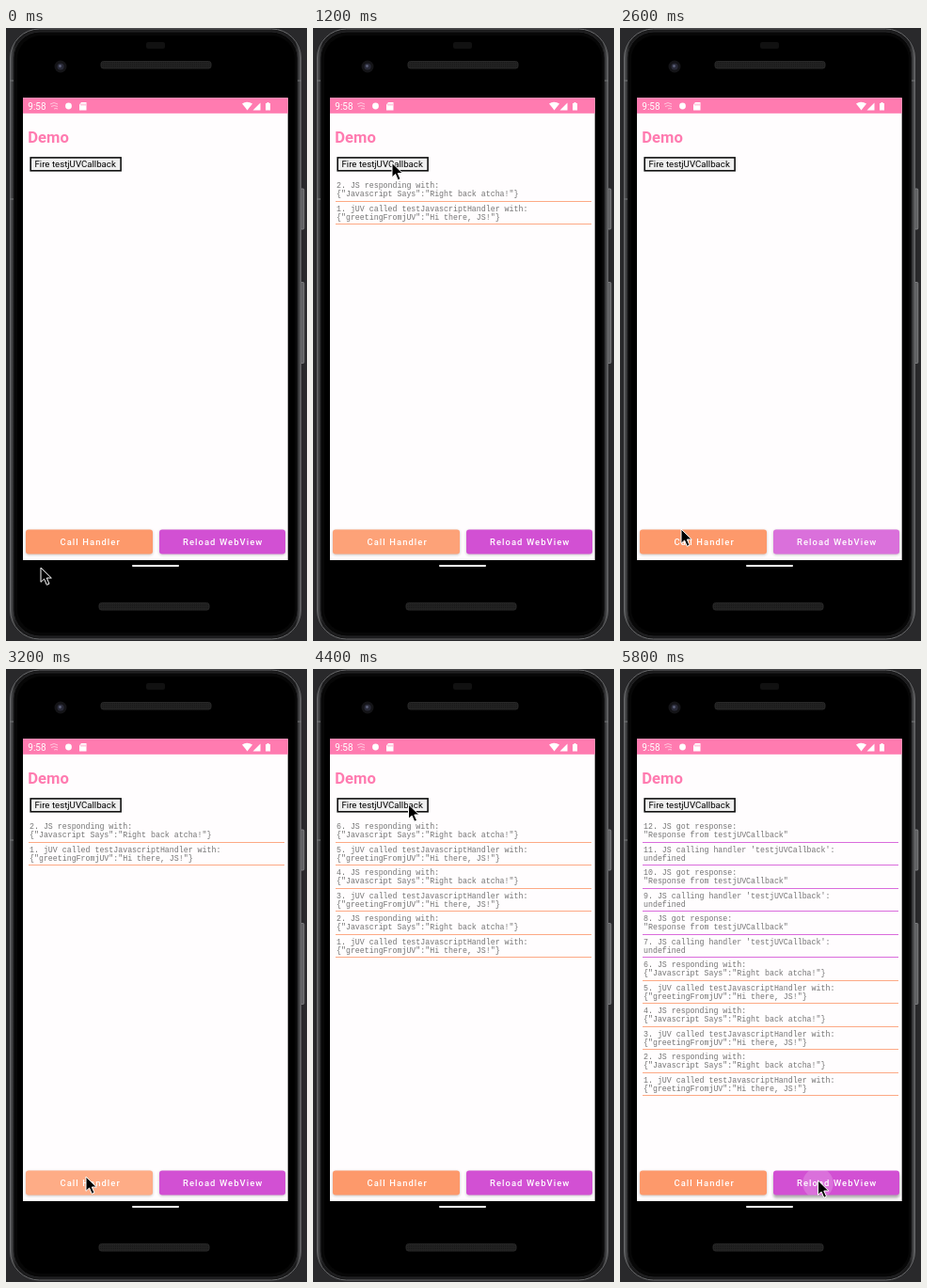
Animation, 320 px wide and 652 px high, one loop 6000 ms. Source, as an HTML page:

```html
<!DOCTYPE html>
<html lang="en">
<head>
<meta charset="utf-8">
<title>Demo</title>
<style>
  html, body { margin: 0; width: 100%; height: 100%; overflow: hidden; background: #29292b; }
  svg { display: block; width: 320px; height: 652px; }
  text { font-family: Roboto, sans-serif; }
  .log text { font: 8.28px "Liberation Mono", monospace; fill: #747474; }
  .log rect { shape-rendering: crispEdges; }
  .label { font-size: 9.4px; font-weight: 500; letter-spacing: 1.08px; fill: #fff; }
</style>
</head>
<body>
<svg viewBox="0 0 320 652">
  <defs>
    <linearGradient id="rim" x2="1" y2="0">
      <stop offset="0" stop-color="#58595b"/>
      <stop offset=".018" stop-color="#1b1b1c"/>
      <stop offset=".982" stop-color="#1b1b1c"/>
      <stop offset="1" stop-color="#5c5d5f"/>
    </linearGradient>
    <pattern id="mesh" width="2" height="2" patternUnits="userSpaceOnUse">
      <rect width="2" height="2" fill="#222"/>
      <rect width="1" height="1" fill="#181818"/>
    </pattern>
    <filter id="blur" x="-10%" y="-50%" width="120%" height="200%"><feGaussianBlur stdDeviation="1.5"/></filter>
    <clipPath id="callClip"><rect x="21" y="533.5" width="135" height="26" rx="3"/></clipPath>
    <clipPath id="reloadClip"><rect x="163" y="533.5" width="134" height="26" rx="3"/></clipPath>
  </defs>

  <!-- phone body -->
  <rect width="320" height="652" fill="#29292b"/>
  <g fill="#606163" stroke="#8b8c8e" stroke-width=".8">
    <rect x="313" y="171" width="3.8" height="43" rx="1"/>
    <rect x="313" y="270.5" width="3.8" height="86" rx="1"/>
  </g>
  <rect x="4.5" y="1" width="309" height="649" rx="31" fill="url(#rim)" stroke="#68696b"/>
  <rect x="8" y="4" width="302" height="643" rx="28" fill="#070707" stroke="#242426"/>
  <rect x="12" y="8" width="295" height="635" rx="25"/>
  <path d="M4 56h4M4 182h4M310 56h4" stroke="#77787a"/>
  <rect x="149" y="15" width="20" height="7" rx="2" fill="#111"/>
  <rect x="101" y="35.5" width="117" height="7.5" rx="2.5" fill="url(#mesh)" stroke="#282828"/>
  <rect x="99" y="611.5" width="117" height="7.5" rx="2.5" fill="url(#mesh)" stroke="#282828"/>
  <circle cx="58" cy="41" r="6.5" fill="#141417"/>
  <circle cx="58" cy="41" r="3.6" fill="#292a38"/>
  <circle cx="57.500" cy="40.500" r="1.4" fill="#5c6078"/>

  <!-- screen -->
  <rect x="18" y="74.300" width="281.700" height="491.700" fill="#fffdfe"/>
  <rect x="18" y="74.300" width="281.700" height="16.500" fill="#ff7bb0"/>
  <text x="23.300" y="86.700" font-size="10" fill="#fff">9:58</text>
  <path d="M47 81q4-3 8 0M48 83.500q3-2 7 0M51 86q2-1 4 0" fill="none" stroke="#fff" stroke-opacity=".55"/>
  <circle cx="66.500" cy="83" r="3.400" fill="#fff"/>
  <g fill="#fff">
    <path d="M80 79h5.500v8.500H78V81.500z"/>
    <path d="M251 80.500q5.500-3.600 11 0l-5.500 7z"/>
    <path d="M262.500 87.500l8-8v8z"/>
    <path d="M276 80h1.500v-1h2v1h1.500v7.500h-5z"/>
  </g>
  <path d="M80 80.500v2M82 80.500v2M84 80.500v2" stroke="#ff7bb0" stroke-width=".8"/>
  <path d="M259 84l3 3M262 84l-3 3" stroke="#ff7bb0"/>
  <text x="23.300" y="122.300" font-size="16.600" font-weight="700" fill="#ff7bb0">Demo</text>
  <rect x="26.200" y="137.900" width="95.900" height="13.900" fill="#efefef" stroke="#101010" stroke-width="1.600"/>
  <text x="30.500" y="148.200" font-size="9.660">Fire testjUVCallback</text>
  <g class="log" id="log"></g>

  <!-- bottom buttons -->
  <rect id="callShade" x="21" width="135" height="26" rx="3" filter="url(#blur)"/>
  <rect id="reloadShade" x="163" width="134" height="26" rx="3" filter="url(#blur)"/>
  <rect x="21" y="533.500" width="135" height="26" rx="3" fill="#fd996b"/>
  <rect x="163" y="533.500" width="134" height="26" rx="3" fill="#d250d3"/>
  <g clip-path="url(#callClip)"><circle id="callRipple" fill="#fff"/></g>
  <g clip-path="url(#reloadClip)"><circle id="reloadRipple" fill="#fff"/></g>
  <text class="label" x="57.500" y="550">Call Handler</text>
  <text class="label" x="188" y="550">Reload WebView</text>

  <rect x="18" y="566" width="282" height="14"/>
  <rect x="134" y="571" width="50" height="2" rx="1" fill="#fff"/>

  <path id="cursor" d="M0 0V15.300L3.600 12L6.300 18.300L9 17.100L6.300 11H11.300Z" stroke="#fff"/>
</svg>
<script>
  const LOOP = 6000, STEP = 200;
  const $ = id => document.getElementById(id);

  // time, x, y of the pointer tip
  const path = [
    [0, 37, 574], [400, 84, 540], [800, 85, 540], [1200, 84, 143.5], [1600, 84, 143.5],
    [2000, 208, 542], [2400, 208, 542], [2600, 65, 533], [2800, 85, 540],
    [3800, 85, 540], [4400, 101.5, 144], [5000, 101.5, 144], [5600, 210.5, 544], [6000, 210.5, 544]
  ];
  const actions = [
    [800, "call"], [1400, "fire"], [2400, "clear"], [3000, "call"], [3400, "call"],
    [3800, "call"], [4600, "fire"], [4800, "fire"], [5000, "fire"]
  ];
  const presses = {
    call: [700, 2840, 3280, 3700],
    reload: [2200, 5740]
  };
  const messages = {
    call: [
      ["jUV called testJavascriptHandler with:", '{"greetingFromjUV":"Hi there, JS!"}'],
      ["JS responding with:", '{"Javascript Says":"Right back atcha!"}']
    ],
    fire: [
      ["JS calling handler 'testjUVCallback':", "undefined"],
      ["JS got response:", '"Response from testjUVCallback"']
    ]
  };
  const lineColor = { call: "#fda985", fire: "#da6cdc" };

  function pointer(t) {
    const i = path.findIndex(p => p[0] > t);
    const [t0, x0, y0] = path[i - 1], [t1, x1, y1] = path[i];
    const u = (t - t0) / (t1 - t0), k = u * u * (3 - 2 * u);
    return [x0 + (x1 - x0) * k, y0 + (y1 - y0) * k];
  }

  function entries(t) {
    let rows = [];
    for (const [at, kind] of actions) {
      if (at > t) break;
      if (kind === "clear") rows = [];
      else for (const m of messages[kind]) rows.unshift([kind, rows.length + 1, ...m]);
    }
    return rows;
  }

  function drawLog(t) {
    $("log").innerHTML = entries(t).map(([kind, n, head, body], i) =>
      `<g transform="translate(0 ${i * 24.5})">
        <text x="25" y="170">${n}. ${head}</text>
        <text x="25" y="179.2">${body}</text>
        <rect x="24" y="183.6" width="272" height="1" fill="${lineColor[kind]}"/>
      </g>`).join("");
  }

  function drawPress(name, t) {
    const start = presses[name].filter(p => p <= t).pop();
    const age = start === undefined ? Infinity : t - start;
    const active = age < 600, raised = age < 350;
    const ripple = $(name + "Ripple"), shade = $(name + "Shade");
    ripple.setAttribute("opacity", active ? 0.18 * Math.min(1, (600 - age) / 200) : 0);
    if (active) {
      const [x, y] = pointer(start);
      ripple.setAttribute("cx", x);
      ripple.setAttribute("cy", y + 3);
      ripple.setAttribute("r", Math.min(150, 4 + age * 0.12 + age * age / 700));
    }
    shade.setAttribute("y", raised ? 536.5 : 534.5);
    shade.setAttribute("opacity", raised ? 0.32 : 0.22);
  }

  let last = -1;
  function frame(now) {
    const t = Math.floor(now % LOOP / STEP) * STEP;
    if (t !== last) {
      last = t;
      drawLog(t);
      drawPress("call", t);
      drawPress("reload", t);
      $("cursor").setAttribute("transform", `translate(${pointer(t)})`);
    }
    requestAnimationFrame(frame);
  }
  frame(performance.now());
</script>
</body>
</html>
```
